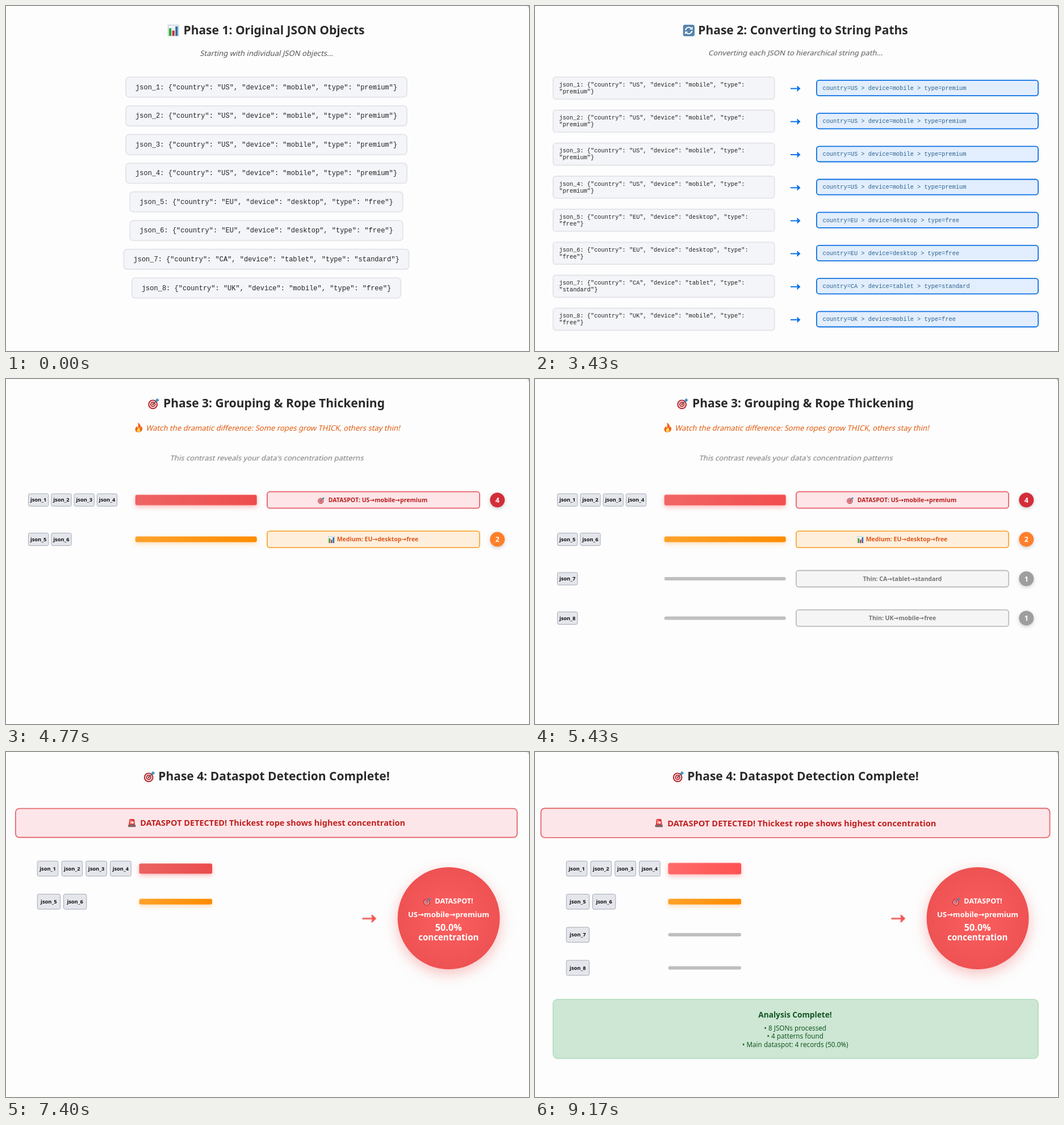
An HTML page for the animation above (9.21 s loop, 921 by 608 pixels).

```html
<!DOCTYPE html>
<html lang="en">
<head>
<meta charset="utf-8">
<title>JSON ropes</title>
<style>
html, body { margin: 0; width: 100%; height: 100%; overflow: hidden; background: #fdfdfd; }
svg { display: block; }
text { font-family: "Noto Sans", "DejaVu Sans", sans-serif; white-space: pre; }
.mid { text-anchor: middle; }
.b { font-weight: 700; }
.mono { font-family: "Liberation Mono", monospace; fill: #222; }
.phase { animation: 9210ms linear infinite both; }
.p1 { animation-name: p1; }
.p2 { animation-name: p2; }
.p3 { animation-name: p3; }
.p4 { animation-name: p4; }
.in { animation: enter 9210ms ease-out infinite both; }
.grow, .pulse { transform-box: fill-box; transform-origin: center; }
.grow { animation: grow 9210ms ease-out infinite both; }
.badge { filter: drop-shadow(0 2px 3px rgba(0, 0, 0, .2)); }
.spot { filter: drop-shadow(0 8px 12px rgba(240, 80, 80, .35)); }
@keyframes p1 { 0%, 10.53% { opacity: 1 } 13.46%, 100% { opacity: 0 } }
@keyframes p2 { 0%, 14.6% { opacity: 0 } 14.61%, 37.7% { opacity: 1 } 40.17%, 100% { opacity: 0 } }
@keyframes p3 { 0%, 40.9% { opacity: 0 } 40.91%, 64.4% { opacity: 1 } 66.88%, 100% { opacity: 0 } }
@keyframes p4 { 0%, 68.3% { opacity: 0 } 68.31%, 100% { opacity: 1 } }
/* visible long enough for its phase, then reset while the phase is hidden */
@keyframes enter { 0% { opacity: 0 } 1.45%, 60% { opacity: 1 } 60.01%, 100% { opacity: 0 } }
@keyframes grow { 0% { transform: scaleY(.2) } 2.1%, 100% { transform: none } }
</style>
</head>
<body>
<svg id="stage" width="921" height="608" viewBox="0 0 921 608">
  <defs>
    <linearGradient id="red"><stop stop-color="#ff6b6b"/><stop offset="1" stop-color="#ff5252"/></linearGradient>
    <linearGradient id="orange"><stop stop-color="#ffa22b"/><stop offset="1" stop-color="#ff8c00"/></linearGradient>
    <radialGradient id="ball"><stop stop-color="#fc5f5f"/><stop offset="1" stop-color="#ee5253"/></radialGradient>
    <symbol id="chart" viewBox="0 0 20 20">
      <rect x="1" y=".6" width="18" height="18.8" fill="#eef2f5" stroke="#b9c4cc"/>
      <path d="M1 7H19M1 13H19" stroke="#cfd8de" stroke-width=".6"/>
      <path d="M2.5 19V6H6.5V19Z" fill="#2ba52f"/>
      <path d="M8 19V10H12V19Z" fill="#cf2f3c"/>
      <path d="M13.5 19V3H17.5V19Z" fill="#2d6fa8"/>
    </symbol>
    <symbol id="cycle" viewBox="0 0 20 20">
      <rect width="20" height="20" rx="4" fill="#5583ab"/>
      <path d="M4.5 9.5A5.6 5.6 0 0 1 14 6M15.5 10.5A5.6 5.6 0 0 1 6 14" fill="none" stroke="#fff" stroke-width="2"/>
      <path d="M11.4 8.4H16.6V3.2ZM8.6 11.6H3.4V16.8Z" fill="#fff"/>
    </symbol>
    <symbol id="target" viewBox="0 0 20 20">
      <circle cx="8.5" cy="11.5" r="8.2" fill="#b3222b"/>
      <circle cx="8.5" cy="11.5" r="6.3" fill="#f4e9e8"/>
      <circle cx="8.5" cy="11.5" r="4.6" fill="#c42a33"/>
      <circle cx="8.5" cy="11.5" r="2.7" fill="#f4e9e8"/>
      <circle cx="8.5" cy="11.5" r="1.4" fill="#b3222b"/>
      <path d="M8.5 11.5L15 5" stroke="#444f5a" stroke-width="1.3"/>
      <path d="M13 7L13.5 3.2L16.6 .4L17 3L19.7 3.5L16.8 6.6Z" fill="#3f8fc4"/>
    </symbol>
    <symbol id="fire" viewBox="0 0 20 20">
      <path d="M10 20C4 20 2 15.5 3.5 11.5C4 10 5 9 5 7.5C7 8 7.3 9.4 7.4 10.5C9.5 8 9.5 4 8.5 0C13 2 14.6 6 14.5 9.5C15.5 9 15.7 8 15.6 7C18 10 18.5 13 17 16C15.8 18.6 13 20 10 20Z" fill="#f0641e"/>
      <path d="M10 19.6C6.5 19.6 5.6 16 7.5 13.5C8.8 12 9.5 11 9.7 9.2C12.5 11 12.5 13 13 14C14.6 17 13 19.6 10 19.6Z" fill="#ffd04a"/>
    </symbol>
    <symbol id="siren" viewBox="0 0 20 20">
      <path d="M3 15L4 4Q4.3 1 7 1H13Q15.7 1 16 4L17 15Z" fill="#dd3a3a"/>
      <path d="M6 4H9V12H6Z" fill="#ff9d92"/>
      <circle cx="11.5" cy="9" r="2.8" fill="#ffe0d4"/>
      <rect x="1.5" y="14" width="17" height="5.5" rx="1.5" fill="#7c6468"/>
    </symbol>
  </defs>
</svg>
<script>
const LOOP = 9210;
const records = [
  ...Array(4).fill(["US", "mobile", "premium"]),
  ...Array(2).fill(["EU", "desktop", "free"]),
  ["CA", "tablet", "standard"],
  ["UK", "mobile", "free"]
];
const groups = [
  { ids: [1, 2, 3, 4], name: "DATASPOT: US→mobile→premium", icon: ["target", 549], cx: 655, h: 20,
    rope: "url(#red)", fill: "#fde5e8", line: "#e5616a", ink: "#b71c1c", badge: "#d32d3a", glow: "rgba(255,82,82,.4)" },
  { ids: [5, 6], name: "Medium: EU→desktop→free", icon: ["chart", 567], cx: 654.5, h: 10,
    rope: "url(#orange)", fill: "#feefdc", line: "#f9a63a", ink: "#e0561a", badge: "#ff7f2a", glow: "rgba(255,150,20,.3)" },
  { ids: [7], name: "Thin: CA→tablet→standard", cx: 647, h: 6,
    rope: "#bfbfbf", fill: "#f5f5f5", line: "#bdbdbd", ink: "#757575", badge: "#9e9e9e" },
  { ids: [8], name: "Thin: UK→mobile→free", cx: 647, h: 6,
    rope: "#bfbfbf", fill: "#f5f5f5", line: "#bdbdbd", ink: "#757575", badge: "#9e9e9e" }
];

const rows = (list, draw) => list.map(draw).join("");
const at = (delay, body) => `<g class="in" style="animation-delay:${delay}ms">${body}</g>`;
const phase = (n, body) => `<g class="phase p${n}">${body}</g>`;
const icon = (name, x, y, size) => `<use href="#${name}" x="${x}" y="${y}" width="${size}" height="${size}"/>`;
const text = (x, y, size, str, fill = "#111", cls = "mid b") =>
  `<text class="${cls}" x="${x}" y="${y}" font-size="${size}" fill="${fill}">${str}</text>`;
const slanted = (x, y, str, fill) =>
  `<text class="mid" transform="translate(${x} ${y}) skewX(-13)" font-size="13.1" fill="${fill}">${str}</text>`;
// Box given by its outer edges
const box = (x, y, w, h, r, fill, line, lw = 1.8) =>
  `<rect x="${x + lw / 2}" y="${y + lw / 2}" width="${w - lw}" height="${h - lw}" rx="${r}" fill="${fill}" stroke="${line}" stroke-width="${lw}"/>`;
const arrow = (x, y, k, fill) =>
  `<path transform="translate(${x} ${y}) scale(${k})" fill="${fill}" d="M0-1H12L11-4.6H12.4L17.5 0L12.4 4.6H11L12 1H0Z"/>`;
const title = (str, name, x) => icon(name, x, 33, 20.5) + text(472, 49.8, 21, str, "#2a2a2a");
const chips = (ids, x, y, w, h, step) => rows(ids, (id, i) =>
  box(x + i * step, y - h / 2, w, h, 2.5, "#e4e6ec", "#a5abb5", 1) +
  text(x + i * step + w / 2, y + 3.2, 9.3, "json_" + id));
const rope = (g, x, y, w, delay, cls) => {
  const glow = g.glow ? `style="filter:drop-shadow(0 3px 4px ${g.glow})"` : "";
  return `<g ${glow}><g class="grow" style="animation-delay:${delay}ms">` +
    `<rect class="${g.h === 20 ? "pulse " + cls : ""}" x="${x}" y="${y - g.h / 2}" width="${w}" height="${g.h}" rx="3" fill="${g.rope}"/></g></g>`;
};

const phase1 = title("Phase 1: Original JSON Objects", "chart", 284.5) +
  slanted(458.5, 87.5, "Starting with individual JSON objects...", "#555") +
  rows(records, ([c, d, k], i) => {
    const str = `json_${i + 1}: {"country": "${c}", "device": "${d}", "type": "${k}"}`;
    const w = str.length * 7.2 + 36, y = 124.4 + i * 50.55;
    return box(458.5 - w / 2, y, w, 37.2, 6, "#f4f5f9", "#e2e4e9") +
      text(458.5 - w / 2 + 18, y + 22.3, 12, str, "#222", "mono");
  });

const phase2 = at(1350, title("Phase 2: Converting to String Paths", "cycle", 260.5)) +
  at(1650, slanted(458.5, 87.5, "Converting each JSON to hierarchical string path...", "#555")) +
  rows(records, ([c, d, k], i) => {
    const y = 124.4 + i * 58.2, start = 1900 + i * 110;
    return at(start, box(31, y, 391.6, 40.6, 4.5, "#f4f5f8", "#e2e4e9") +
        text(42.5, y + 17.6, 10.29, `json_${i + 1}: {"country": "${c}", "device": "${d}", "type":`, "#222", "mono") +
        text(42.5, y + 29.6, 10.29, `"${k}"}`, "#222", "mono")) +
      at(start + 250, arrow(450, y + 21.2, 1, "#0b72e7")) +
      at(start + 500, box(495, y + 5.6, 392, 29, 4.5, "#e2eefd", "#0d70e4") +
        `<text class="mono" x="506.5" y="${y + 23.4}" font-size="10.29" style="fill:#2b628f">country=${c} &gt; device=${d} &gt; type=${k}</text>`);
  });

const phase3 = at(3800, title("Phase 3: Grouping &amp; Rope Thickening", "target", 250)) +
  at(4100, icon("fire", 225, 77, 17) +
    slanted(470, 91, "Watch the dramatic difference: Some ropes grow THICK, others stay thin!", "#e05a0c")) +
  at(4200, slanted(459, 144, "This contrast reveals your data's concentration patterns", "#777")) +
  rows(groups, (g, i) => {
    const y = 213.2 + i * 69.4, start = 4320 + i * 230;
    return at(start, chips(g.ids, 39, y, 36.3, 23, 40.3) +
      rope(g, 227.7, y, 214, start, "early") +
      box(459, y - 15.4, 376, 30.8, 4.5, g.fill, g.line) +
      (g.icon ? icon(g.icon[0], g.icon[1], y - 5.5, 12.5) : "") +
      text(g.cx, y + 3.8, 10.5, g.name, g.ink) +
      `<circle class="badge" cx="865.3" cy="${y}" r="13" fill="${g.badge}"/>` +
      text(865.3, y + 4.5, 12.5, g.ids.length, "#fff"));
  });

const phase4 = at(6300, title("Phase 4: Dataspot Detection Complete!", "target", 242.5)) +
  at(6300, `<g id="banner" class="pulse">` +
    box(30.5, 99.6, 856, 51, 6.5, "#fde6e9", "#e46c70") + icon("siren", 222, 117.5, 15) +
    text(469.3, 130.3, 14, "DATASPOT DETECTED! Thickest rope shows highest concentration", "#c02020") + `</g>`) +
  rows(groups, (g, i) => {
    const y = 205.5 + i * 58.3, start = [6950, 7180, 7430, 7560][i];
    return at(start, (i ? chips(g.ids, 54.7, y, 41.3, 27.5, 46.3) : chips(g.ids, 54.7, y, 37.6, 27.5, 42.8)) +
      rope(g, 234.5, y, 128.6, start, "late"));
  }) +
  at(6850, arrow(627.5, 293.5, 1.42, "#f05656")) +
  at(6900, `<circle class="spot" cx="779.6" cy="293" r="90" fill="url(#ball)"/>` +
    icon("target", 735, 256.5, 14) +
    text(789, 267.3, 12.6, "DATASPOT!", "#fff") +
    text(779.5, 291, 13, "US→mobile→premium", "#fff") +
    text(779.3, 314.5, 16.2, "50.0%", "#fff") +
    text(779.3, 331.5, 15.1, "concentration", "#fff")) +
  at(7660, box(31, 435, 856, 106, 8, "#cde7d4", "#b8dfc3") +
    text(458, 467.5, 13.7, "Analysis Complete!", "#155724") +
    rows(["8 JSONs processed", "4 patterns found", "Main dataspot: 4 records (50.0%)"],
      (s, i) => text(458.3, 490.6 + i * 14.7, 11.7, "• " + s, "#155724", "mid")));

const stage = document.getElementById("stage");
stage.insertAdjacentHTML("beforeend",
  [phase1, phase2, phase3, phase4].map((body, i) => phase(i + 1, body)).join("") +
  `<path d="M917.5 0Q920.5 1.5 921 6.5V0Z" fill="#c4c4c4"/>`);

const clock = stage.querySelector(".p1").getAnimations()[0];
const banner = document.getElementById("banner");
const ropes = [[stage.querySelector(".early"), 4900], [stage.querySelector(".late"), 9170]];
const wave = (t, peak, period) => .5 + .5 * Math.cos(2 * Math.PI * (t - peak) / period);

function tick() {
  const t = (clock.currentTime || 0) % LOOP;
  banner.style.transform = `scale(${1 + .05 * wave(t, 9170, 469)})`;
  for (const [el, peak] of ropes) {
    const k = wave(t, peak, 400);
    el.style.transform = `scaleY(${.9 + .1 * k})`;
    el.style.filter = `brightness(${.92 + .08 * k})`;
  }
  requestAnimationFrame(tick);
}
tick();
</script>
</body>
</html>
```
